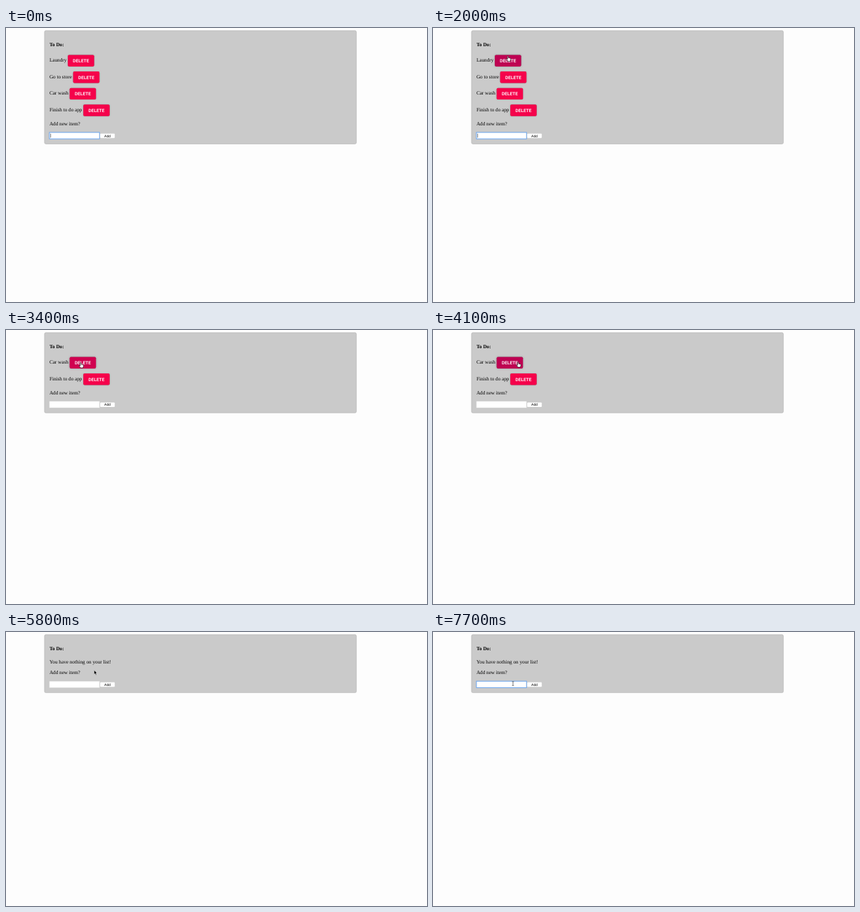
Animation of 600x391 px, one loop 8000 ms. Source, as an HTML page:

```html
<!DOCTYPE html>
<html lang="en">
<head>
<meta charset="utf-8">
<title>To Do</title>
<style>
  html, body { margin: 0; width: 100%; height: 100%; overflow: hidden; background: #fdfdfd; }
  svg { display: block; width: 100%; height: 100%; }
  text { font: 7.2px "Liberation Serif", serif; text-rendering: geometricPrecision; }
  .title { font-weight: 700; }
  .label { font: 500 6.3px Roboto, sans-serif; letter-spacing: .18px; fill: #fff; stroke: #fff; stroke-width: .1; }
  .add { font: 5px "Liberation Sans", sans-serif; }
  .btn rect { filter: drop-shadow(0 .7px .5px rgba(0, 0, 0, .3)) drop-shadow(0 .4px .9px rgba(0, 0, 0, .16)); }
  .btn.over rect { filter: drop-shadow(0 .9px .7px rgba(0, 0, 0, .3)) drop-shadow(0 .9px 1.4px rgba(0, 0, 0, .22)); }
</style>
</head>
<body>
<svg viewBox="0 0 600 391" preserveAspectRatio="xMinYMin meet">
  <rect width="600" height="391" fill="#fdfdfd"/>
  <rect id="panel" x="54.9" y="3.8" width="444.4" rx="1.8" fill="#cacaca" stroke="#b0b0b0" stroke-width=".6"/>
  <text class="title" x="61.9" y="26.4">To Do:</text>
  <text id="empty" x="61.9" y="44.7">You have nothing on your list!</text>
  <g id="rows"></g>
  <g id="form">
    <text x="61.9" y="44.7">Add new item?</text>
    <rect id="field" x="61.9" y="54.6" width="71.4" height="9.2" fill="#fff"/>
    <rect id="caret" x="63.5" y="56.4" width=".6" height="5.6" fill="#333"/>
    <rect x="134" y="56" width="21.2" height="6.9" rx="1.2" fill="#fff" stroke="#bbb" stroke-width=".3"/>
    <text class="add" x="140.1" y="61.2">Add</text>
  </g>
  <g id="arrow">
    <path d="M0 0V5.8L1.4 4.6L2.4 6.8L3.4 6.4L2.4 4.2H4.2Z" fill="#000" stroke="#fff" stroke-width=".4"/>
  </g>
  <g id="hand">
    <path d="M-.7 .5Q0 -.4 .6 .5L.8 2.8Q1.6 2.2 2 3Q2.8 2.6 3.1 3.3Q4 3 4.1 4L3.7 6.1L3.2 7.5H-.1L-2.4 4.5Q-2.3 3.6 -1.4 4L-.5 4.8Z" fill="#fff" stroke="#111" stroke-width=".6"/>
  </g>
  <g id="beam">
    <path d="M-1.3 -3Q0 -3 0 -2.2Q0 -3 1.3 -3M0 -2.2V2.2M-1.3 3Q0 3 0 2.2Q0 3 1.3 3" fill="none" stroke="#222" stroke-width=".6"/>
  </g>
</svg>
<script>
const LOOP = 8000, STEP = 100, PITCH = 23.6, TOP = 38.5, BTN_W = 37.5, BTN_H = 16.4;
const items = [
  { name: "Laundry", x: 88.1, gone: 2600 },
  { name: "Go to store", x: 95.7, gone: 3300 },
  { name: "Car wash", x: 90.7, gone: 4300 },
  { name: "Finish to do app", x: 110.2, gone: 5600 }
];
// time, x, y of the pointer tip
const path = [
  [100, 235, 226], [900, 130, 48], [1500, 108, 43], [2000, 106.8, 40],
  [2500, 105.6, 46.6], [3300, 105.6, 46.6], [4000, 121.2, 45.6], [4400, 121.2, 45.6],
  [4800, 128.2, 45.6], [5200, 128.5, 51], [5500, 128.5, 47], [5900, 125.1, 56],
  [6300, 125.1, 56], [6600, 130, 45], [6900, 134, 82], [7200, 114, 73.6]
];
const red = [245, 2, 75], dark = [190, 2, 82];
const $ = id => document.getElementById(id);

function set(el, attrs) {
  for (const k in attrs) el.setAttribute(k, attrs[k]);
}
const show = (el, on) => set(el, { visibility: on ? "visible" : "hidden" });
const move = (el, x, y) => set(el, { transform: `translate(${x} ${y})` });

for (const item of items) {
  $("rows").insertAdjacentHTML("beforeend",
    `<g><text x="61.9" y="48.3">${item.name}</text>
     <g class="btn"><rect x="${item.x}" y="${TOP}" width="${BTN_W}" height="${BTN_H}" rx="1.8"/>
     <text class="label" x="${item.x + 7.2}" y="49">DELETE</text></g></g>`);
  item.row = $("rows").lastElementChild;
  item.button = item.row.querySelector(".btn");
}

function pointer(t) {
  const i = path.findIndex(p => p[0] > t);
  if (i < 0) return path[path.length - 1].slice(1);
  if (i === 0) return path[0].slice(1);
  const [t0, x0, y0] = path[i - 1], [t1, x1, y1] = path[i];
  const u = (t - t0) / (t1 - t0), e = u * u * (3 - 2 * u);
  return [x0 + (x1 - x0) * e, y0 + (y1 - y0) * e];
}

const inside = ([x, y], l, t, w, h) => x >= l && x <= l + w && y >= t && y <= t + h;
const listAt = t => items.filter(item => t < item.gone);

function hovered(t) {
  const p = pointer(t);
  return listAt(t).find((item, i) => inside(p, item.x, TOP + PITCH * i, BTN_W, BTN_H));
}

// Share of the last few steps spent under the pointer
function hoverLevel(item, t) {
  let n = 0;
  for (let k = 0; k < 3; k++) n += hovered(t - k * STEP) === item;
  return n / 3;
}

function draw(t) {
  const list = listAt(t), foot = list.length ? PITCH * list.length : 15.6;
  const p = pointer(t), over = hovered(t);
  set($("panel"), { height: 67.2 + foot });
  move($("form"), 0, foot);
  show($("empty"), !list.length);

  for (const item of items) {
    const i = list.indexOf(item);
    show(item.row, i >= 0);
    if (i < 0) continue;
    move(item.row, 0, PITCH * i);
    const h = hoverLevel(item, t);
    item.button.classList.toggle("over", item === over);
    set(item.button.firstElementChild, {
      fill: `rgb(${red.map((c, k) => Math.round(c + (dark[k] - c) * h))})`
    });
  }

  const focus = t < 2500 || t >= 7200;
  const blink = (t < 2500 ? t : t - 7200) % 1000 < 500;
  set($("field"), { stroke: focus ? "#6aa5ee" : "#d8d8d8", "stroke-width": focus ? 1 : .4 });
  show($("caret"), focus && blink);

  const beam = inside(p, 62, 54.7 + foot, 71, 9) || (!list.length && inside(p, 62, 38, 88, 9));
  const kind = t < 100 ? "" : over ? "hand" : beam ? "beam" : "arrow";
  for (const id of ["arrow", "hand", "beam"]) {
    show($(id), id === kind);
    move($(id), ...p);
  }
}

const start = performance.now();
function frame() {
  const t = (performance.now() - start) % LOOP;
  draw(Math.floor(t / STEP) * STEP);
  requestAnimationFrame(frame);
}
frame();
</script>
</body>
</html>
```
